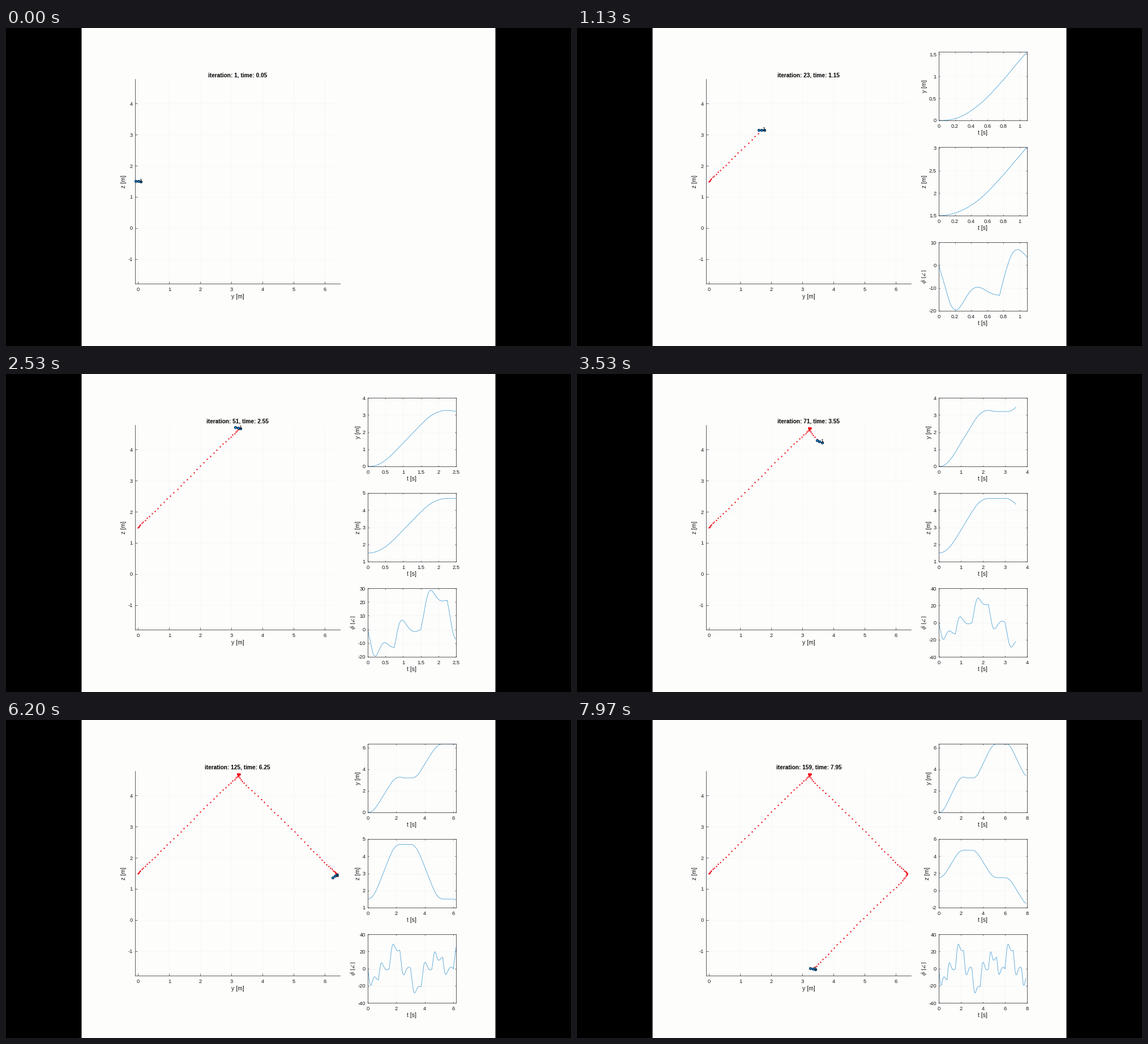
Recreate the animation shown at these times as a matplotlib script. Size 998 px wide and 561 px high, loop 8000 ms.

```python
import math

import matplotlib.pyplot as plt
import numpy as np
from matplotlib.animation import FuncAnimation
from matplotlib.patches import Rectangle

W, H, DPI = 998, 561, 100
STEPS = 160
PT = 72 / DPI                    # points per pixel
INK, GRID, BLUE, PAPER = "#1a1a1a", "#f5f5f7", "#0072bd", "#fdfdfc"
TICK_PX, LABEL_PX, TITLE_PX = 9.4, 10.4, 10.15
ARM = 0.086                      # rotor distance from the centre, metres

plt.rcParams.update({
    "font.family": "Liberation Sans",
    "mathtext.fontset": "stix",
    "axes.unicode_minus": False,
})


# ---- flight data, one sample per 10 ms ----

def curve(knots, n, rest=False):
    """Cubic Hermite curve through evenly spaced knots."""
    v = np.array(knots, float)
    m = np.gradient(v)
    if rest:
        m[0] = m[-1] = 0
    u = np.linspace(0, len(v) - 1, n, endpoint=False)
    i = u.astype(int)
    f = u - i
    smooth = f * f * (3 - 2 * f)
    return (v[i] * (1 - smooth) + v[i + 1] * smooth
            + m[i] * f * (1 - f) ** 2 - m[i + 1] * f * f * (1 - f))


def leg(knots):
    return np.maximum(curve(knots, 300, rest=True), 0)


def tilt(knots):
    return curve(knots, 75)


y_out = leg([0, .07, .36, .82, 1.365, 1.89, 2.42, 2.90, 3.18, 3.27, 3.21, 3.2, 3.2])
y_leg = leg([0, .035, .265, .75, 1.28, 1.82, 2.34, 2.78, 3.06, 3.15, 3.155, 3.15, 3.15])
climb = leg([0, .09, .36, .81, 1.335, 1.86, 2.39, 2.84, 3.10, 3.19, 3.19, 3.19, 3.19])
climb = np.minimum(climb, 3.19)

lean = tilt([0, -9, -17.5, -19.5, -16.3, -12.1, -9.8, -10, -11.5, -12.7, -13.2])
cruise = tilt([-13.2, -3, 4.6, 6.8, 5, 2.2, 0, -1.3, -1.6, -1, -.3])
brake = tilt([-.3, 9.5, 20.5, 27, 28.5, 26.2, 23.4, 21.4, 20.8, 21, 21.2])
settle = tilt([21.2, 10, -1, -6.6, -7, -4.5, -1.5, .6, 1.6, 1.5, .4])

Y = np.concatenate([y_out, 3.2 + y_leg, 6.35 - y_leg])
Z = 1.5 + np.concatenate([climb, 3.19 - climb, -climb])
PHI = np.concatenate([lean, cruise, brake, settle, -brake, -settle,
                      -lean, -cruise, brake, settle, lean])
T = np.arange(len(Y)) / 100


# ---- axis limits and ticks ----

NICE = [m * 10.0 ** e for e in range(-6, 3) for m in (1, 2, 5)]
EPS = 1e-6


def limits(lo, hi):
    """Tick-aligned limits, or tight ones if alignment wastes much room."""
    hi = max(hi, lo + 1e-5)
    for step in NICE:
        a = math.floor(lo / step + EPS) * step
        b = math.ceil(hi / step - EPS) * step
        if round((b - a) / step) <= 5:
            break
    if max(lo - a, b - hi) > 0.8 * step:
        a, b = lo, hi
        step = next(s for s in NICE if (hi - lo) / s < 6)
    first, last = math.ceil(a / step - EPS), math.floor(b / step + EPS)
    return a, b, [round(k * step, 7) for k in range(first, last + 1)]


def names(ticks):
    return [f"{v + 0.0:g}" for v in ticks]


def text_width(s):
    em = {".": .278, "-": .333}
    return TICK_PX * sum(em.get(c, .556) for c in s)


# ---- layout ----

fig = plt.figure(figsize=(W / DPI, H / DPI), dpi=DPI, facecolor="black")
fig.add_artist(Rectangle((133.5 / W, 0), 731 / W, 1, transform=fig.transFigure,
                         fc=PAPER, ec="none", snap=False, zorder=-1))


def make_axes(left, top, right, bottom, tick_len):
    ax = fig.add_axes([left / W, 1 - bottom / H, (right - left) / W, (bottom - top) / H],
                      facecolor="none")
    ax.set_axisbelow(True)
    ax.grid(color=GRID, lw=0.7 * PT)
    ax.tick_params(direction="in", length=tick_len * PT, width=0.65 * PT, color=INK,
                   labelcolor=INK, labelsize=TICK_PX * PT)
    ax.tick_params(axis="x", pad=6.2 * PT)
    ax.tick_params(axis="y", pad=4 * PT)
    for spine in ax.spines.values():
        spine.set(linewidth=0.7 * PT, color=INK)
    return ax


def label(ax, x, y, s, size=LABEL_PX, **kw):
    kw = {"color": INK, "ha": "center", "va": "center", **kw}
    return ax.text(x / W, 1 - y / H, s, transform=fig.transFigure,
                   fontsize=size * PT, **kw)


scene = make_axes(228, 90, 590, 451, 3.6)
scene.spines[["top", "right"]].set_visible(False)
scene.set(xlim=(-0.1, 6.482), ylim=(-1.782, 4.782))
scene.set_xticks(range(7), names(range(7)))
scene.set_yticks(range(-1, 5), names(range(-1, 5)))
label(scene, 409, 474, "y [m]")
label(scene, 208, 270.5, "z [m]", rotation=90)
title = label(scene, 409.3, 83, "", TITLE_PX, color="black", weight="bold")

trail, = scene.plot([], [], "o", color="#f00814", ms=2.4 * PT, mew=0, clip_on=False)
body, = scene.plot([], [], "-o", color="black", lw=0.7 * PT, ms=4.5 * PT,
                   mfc=BLUE, mec="#0b1c2c", mew=0.7 * PT, clip_on=False, zorder=4)
tag = scene.text(0, 0, "1", fontsize=TICK_PX * PT, color="black",
                 ha="center", va="center", zorder=5)


class Chart:
    def __init__(self, top, data, name, size=LABEL_PX):
        self.data = data
        self.ax = make_axes(639, top, 795, top + 121, 1.7)
        self.ax.tick_params(top=True, right=True)
        self.line, = self.ax.plot([], [], color="#3a98d1", lw=0.75 * PT)
        label(self.ax, 717, top + 143.5, "t [s]")
        self.name = label(self.ax, 615, top + 60.5, name, size, rotation=90)

    def show(self, n):
        self.ax.set_visible(n > 0)
        if n == 0:
            return
        t, v = T[:n], self.data[:n]
        self.line.set_data(t, v)
        a, b, ticks = limits(0, t[-1])
        self.ax.set_xticks(ticks, names(ticks))
        self.ax.set_xlim(a, b)
        a, b, ticks = limits(v.min(), v.max())
        texts = names(ticks)
        self.ax.set_yticks(ticks, texts)
        self.ax.set_ylim(a, b)
        self.name.set_x((627 - max(map(text_width, texts))) / W)


charts = [Chart(42, Y, "y [m]"),
          Chart(210, Z, "z [m]"),
          Chart(378, PHI, r"$\phi\ [\angle]$", 10.8)]


# ---- animation ----

def draw(frame):
    step = min(frame + 1, STEPS - 1)
    now = 5 * step
    title.set_text(f"iteration: {step}, time: {step * 0.05:.2f}")
    trail.set_data(Y[:now:5], Z[:now:5])

    angle = math.radians(PHI[now])
    arm = ARM * np.array([-1, 0, 1])
    body.set_data(Y[now] + arm * math.cos(angle), Z[now] + arm * math.sin(angle))
    tag.set_position((Y[now] + 0.075, Z[now] + 0.015))

    for chart in charts:
        chart.show(now - 5)
    return []


anim = FuncAnimation(fig, draw, frames=STEPS, init_func=lambda: draw(0),
                     interval=50, repeat=True, repeat_delay=0, blit=False)
plt.show()
```
